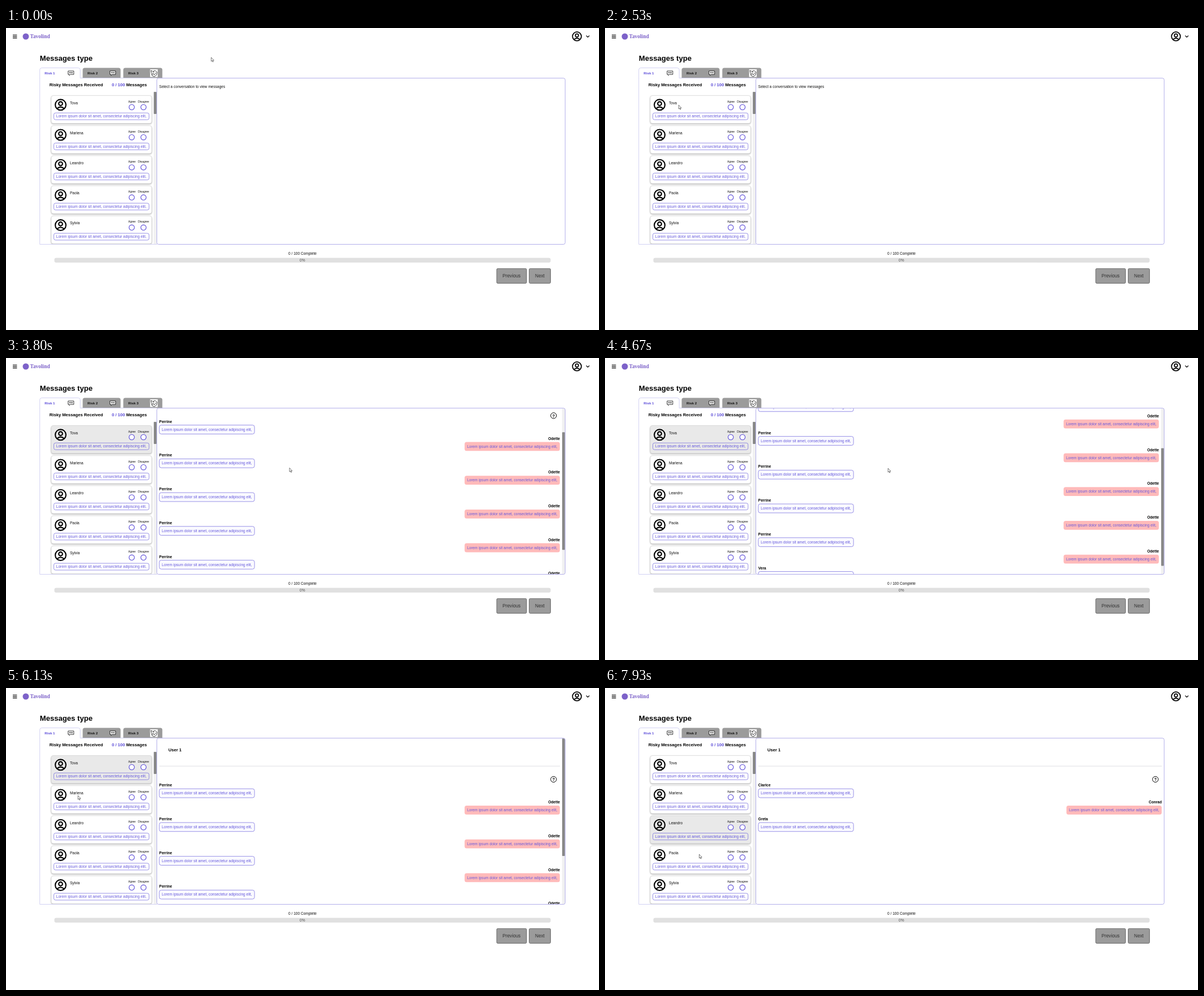
Animation, 1048 px wide and 534 px high, one loop 8 s. Source, as an HTML page:

```html
<!DOCTYPE html>
<html lang="en">
<head>
<meta charset="utf-8">
<title>Messages type</title>
<style>
  html, body { margin: 0; width: 100%; height: 100%; overflow: hidden; background: #fff; }
  svg { display: block; width: 1048px; height: 534px; }
  text { font-family: "Liberation Sans", Arial, sans-serif; font-size: 6.55px; fill: #111; white-space: pre; }
  .bold { font-weight: 700; fill: #000; }
  .mid { font-size: 7.64px; }
  .tiny { font-size: 4.9px; }
  .tab { font-size: 6.2px; font-weight: 700; }
  .purple { fill: #5a4bd8; }
  .lorem { fill: #6558dc; }
  .line { fill: none; stroke: #000; }
  .end { text-anchor: end; }
  .center { text-anchor: middle; }
  .card { fill: #fff; stroke: #d2d2d2; stroke-width: .6; filter: drop-shadow(0 1px 1px rgba(0,0,0,.32)); }
  .card.on { fill: #e9e9e9; }
  .box { stroke: #6f65dd; stroke-width: .7; }
  .radio { fill: #fff; stroke: #5a4bd8; stroke-width: 1.1; }
  .track { fill: #f1f1f1; }
  .thumb { fill: #888; }
  .button { fill: #9b9b9b; stroke: #555; stroke-width: .8; }
</style>
</head>
<body>
<svg viewBox="0 0 1048 534">
  <defs>
    <g id="avatar" class="line" stroke-width="2">
      <circle r="9"/><circle cy="-2" r="3.2"/><path d="M-6.2 6.6Q0 .8 6.2 6.6"/>
    </g>
    <g id="chat" class="line" stroke-width=".8">
      <path d="M-5-3.5H5V2.6H-1.2L-3 4.4V2.6H-5Z" fill="#fff"/>
      <path d="M-3-.4h1.4M-.7-.4H.7M1.6-.4H3" stroke-width="1.5"/>
    </g>
    <g id="help">
      <circle class="line" r="5.1" stroke-width="1"/>
      <text class="bold center" y="2.6" style="font-size:7.4px">?</text>
    </g>
    <clipPath id="listClip"><rect x="60" y="110" width="201" height="272"/></clipPath>
    <clipPath id="paneClip"><rect x="267" y="89.2" width="721" height="292.8" rx="2.5"/></clipPath>
  </defs>

  <path class="line" d="M12 12.2h7.4M12 14.9h7.4M12 17.6h7.4" stroke-width="1.1"/>
  <circle cx="35" cy="15" r="5.5" fill="#7d62c9"/>
  <text x="42.5" y="18" style="font:700 9.4px 'Liberation Serif',serif;fill:#7d62c9">Tavolind</text>
  <use href="#avatar" transform="translate(1009 14.8) scale(.87)"/>
  <path class="line" d="M1025.4 13.5l2.8 2.7 2.8-2.7" stroke-width="1.1"/>
  <text class="bold" x="59.8" y="58.3" style="font-size:13.1px">Messages type</text>

  <path d="M135.5 88.5V74q0-3.5 3.5-3.5h60q3.5 0 3.5 3.5v14.5zM207.3 88.5V74q0-3.5 3.5-3.5h62q3.5 0 3.5 3.5v14.5z" fill="#9b9b9b"/>
  <path d="M59.7 382.5V74q0-3.5 3.5-3.5h64.5q3.5 0 3.5 3.5v14.5H266M59.7 382.5H267M59.7 88.5h71" fill="none" stroke="#cfcdf2" stroke-width=".9"/>
  <path d="M60.3 88.5h70.4" stroke="#fff" stroke-width="1.4"/>
  <text class="tab purple" x="68.3" y="81.8">Risk 1</text>
  <text class="tab" x="144" y="81.8">Risk 2</text>
  <text class="tab" x="216" y="81.8">Risk 3</text>
  <use href="#chat" x="114.8" y="79.5"/>
  <use href="#chat" x="188.7" y="79.5"/>
  <rect x="254.7" y="73" width="13.4" height="13.6" fill="#fff"/>
  <path class="line" d="M256 75l4 2 3-2 4 3-1 5-4 3-4-2-1-5zM259 79l3 4 3-4M258 83l2-2M261 76v3" stroke="#444" stroke-width=".7"/>

  <text class="bold mid" x="76.8" y="103.4">Risky Messages Received</text>
  <text class="bold mid" x="187" y="103.4"><tspan class="purple">0 / 100</tspan> Messages</text>
  <g id="list" clip-path="url(#listClip)"></g>
  <rect class="track" x="261" y="112.5" width="5.5" height="269.5"/>
  <rect class="thumb" x="261.2" y="113" width="4.8" height="39" rx=".8"/>

  <g clip-path="url(#paneClip)">
    <text id="hint" x="270.8" y="105.7">Select a conversation to view messages</text>
    <g id="talks"></g>
    <g id="bar">
      <rect class="track" x="982.7" y="89" width="5.3" height="293"/>
      <rect id="thumb" class="thumb" x="982.9" y="89" width="4.9" height="208" rx=".8"/>
    </g>
  </g>
  <rect x="266.6" y="88.7" width="721.6" height="293.8" rx="3" fill="none" stroke="#aaa5e8" stroke-width=".9"/>

  <text class="center" x="524" y="401">0 / 100 Complete</text>
  <rect x="85.5" y="406.6" width="877" height="8.2" rx="3" fill="#e0e0e0"/>
  <text class="center" x="523.8" y="412.9" style="fill:#555">0%</text>
  <rect class="button" x="867.2" y="425.4" width="52.8" height="26" rx="1.8"/>
  <rect class="button" x="924.6" y="425.4" width="37.8" height="26" rx="1.8"/>
  <text class="center" x="893.5" y="441.2" style="font-size:8.2px;fill:#333">Previous</text>
  <text class="center" x="943.4" y="441.2" style="font-size:8.2px;fill:#333">Next</text>

  <path id="cursor" d="M0 0V6.9L1.6 5.5 2.7 8 3.7 7.6 2.6 5.2H4.8Z" fill="#fff" stroke="#222" stroke-width=".6"/>
</svg>
<script>
const LOOP = 8000, STEP = 1000 / 15;
const LOREM = "Lorem ipsum dolor sit amet, consectetur adipiscing elit,";
const $ = id => document.getElementById(id);

const people = ["Tova", "Marlena", "Leandro", "Paola", "Sylvia"];
$("list").innerHTML = people.map((name, i) => `
  <g transform="translate(0 ${i * 53.2})">
    <rect class="card" x="80" y="119.5" width="177.5" height="49.2" rx="4"/>
    <use href="#avatar" transform="translate(96.5 135.8) scale(1.05)"/>
    <text x="113" y="134.6">${name}</text>
    <text class="tiny" x="216" y="131.6">Agree</text>
    <text class="tiny" x="233.2" y="131.6">Disagree</text>
    <circle class="radio" cx="222.2" cy="140" r="4.7"/>
    <circle class="radio" cx="243" cy="140" r="4.7"/>
    <rect class="box" x="84.5" y="150.2" width="168.3" height="12" rx="3" fill="none"/>
    <text class="lorem" x="88.8" y="158.4">${LOREM}</text>
  </g>`).join("");
const cards = document.querySelectorAll(".card");

function message(name, i, right) {
  const sent = i % 2, x = sent ? right - 168.5 : 270.9;
  const look = sent ? 'fill="#ffbaba"' : 'class="box" fill="#fafaff"';
  return `<g transform="translate(0 ${i * 29.86})">
    <text class="bold${sent ? " end" : ""}" x="${sent ? right : 270.8}" y="174.3">${name}</text>
    <rect ${look} x="${x}" y="178.2" width="168.3" height="15.8" rx="3.5"/>
    <text class="lorem" x="${x + 4.4}" y="188.3">${LOREM}</text>
  </g>`;
}

function talk(names, right) {
  return `<g><text class="bold mid" x="287" y="112">User 1</text>
    <path d="M271 138.1H${right}" stroke="#d6d6dc" stroke-width=".8"/>
    <use href="#help" x="${right - 11.3}" y="161.5"/>
    ${names.map((name, i) => message(name, i, right)).join("")}</g>`;
}

const longTalk = Array.from({ length: 10 }, (_, i) => i % 2 ? "Odette" : "Perrine").concat("Vera");
$("talks").innerHTML = talk(longTalk, 979)
  + talk(["Mirella", "Jasper", "Nadia"], 984)
  + talk(["Clarice", "Conrad", "Greta"], 984);
const talks = [...$("talks").children];

// Rows: step, x, y
const path = [
  [5, 362.7, 52], [18, 105, 66], [20, 72.5, 74.5], [22, 83.3, 73.5], [26, 83.3, 73.5],
  [33, 129.3, 136], [37, 129.3, 136], [38, 130.2, 136.2], [40, 130.2, 136.2],
  [50, 501, 194.3], [60, 501, 194.3], [61, 500.4, 194.3], [64, 500.4, 194.3],
  [65, 500.2, 195], [79, 500.2, 195], [89, 101.3, 179.5], [92, 127.2, 190.2],
  [94, 127.2, 190.2], [97, 123.4, 200.3], [100, 123.4, 200.3], [107, 148, 241],
  [111, 148, 241], [119, 166.5, 294]
];
// Rows: step, scroll offset
const scroll = [[53, 0], [57, 59.6], [59, 120], [66, 120], [70, 99.3], [74, 4.6], [78, 0]];
// Rows: step of the click, chosen card
const clicks = [[0, -1], [40, 0], [94, 1], [110, 2]];

const linear = u => u;
const smooth = u => u * u * (3 - 2 * u);

function at(rows, n, ease) {
  const k = rows.findIndex(row => row[0] >= n);
  if (k < 0) return rows[rows.length - 1].slice(1);
  if (k === 0) return rows[0].slice(1);
  const a = rows[k - 1], b = rows[k], u = ease((n - a[0]) / (b[0] - a[0]));
  return a.slice(1).map((v, i) => v + (b[i + 1] - v) * u);
}

const show = (el, on) => { el.style.display = on ? "" : "none"; };

function draw(time) {
  const n = Math.min(119, Math.floor((time % LOOP + 5) / STEP));
  const [x, y] = at(path, n, smooth);
  const [offset] = at(scroll, n, linear);
  const open = clicks.filter(row => row[0] <= n).pop()[1];
  $("cursor").setAttribute("transform", `translate(${x} ${y})`);
  talks[0].setAttribute("transform", `translate(0 ${-offset})`);
  $("thumb").setAttribute("y", 89 + offset * .71);
  cards.forEach((card, i) => card.classList.toggle("on", i === open));
  talks.forEach((el, i) => show(el, i === open));
  show($("hint"), open < 0);
  show($("bar"), open === 0);
}

const start = performance.now();
function tick() {
  draw(performance.now() - start);
  requestAnimationFrame(tick);
}
tick();
</script>
</body>
</html>
```
